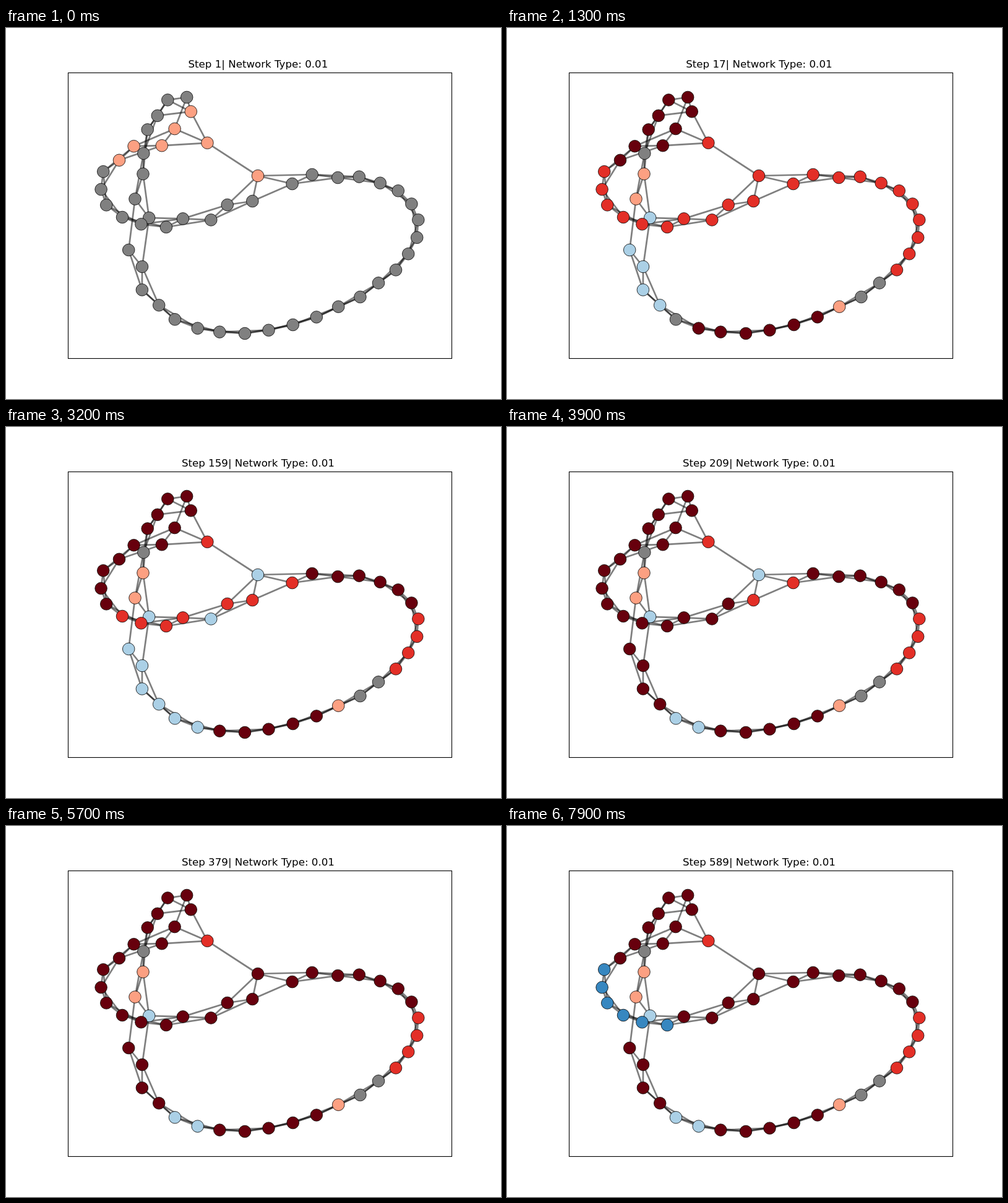
An HTML page that plays this animation: 800 px wide and 600 px high, repeating every 8 s.

```html
<!DOCTYPE html>
<html lang="en">
<head>
<meta charset="utf-8">
<title>Network steps</title>
<style>
  html, body { margin: 0; width: 100%; height: 100%; overflow: hidden; background: #fff; }
  svg { display: block; width: 800px; height: 600px; }
  #edges line { stroke: #000; stroke-opacity: .5; stroke-width: 2.7; }
  #nodes circle { stroke: #000; stroke-width: .8; }
  #title { font: 16.667px "DejaVu Sans", sans-serif; text-anchor: middle; }
</style>
</head>
<body>
<svg viewBox="0 0 800 600">
  <rect x="100.5" y="72.5" width="620" height="462" fill="none" stroke="#000" stroke-width="1.1"/>
  <g id="edges"></g>
  <g id="nodes"></g>
  <text id="title" x="407.4" y="64"></text>
</svg>
<script>
const FRAME_MS = 100, LAST_STEP = 589, RADIUS = 9.8;
const COLORS = {
  gray: '#808080', salmon: '#fca082', red: '#e32f27', dark: '#67000d',
  pale: '#abd0e6', blue: '#3787c0'
};

// Node centres, in ring order.
const nodes = `407,239 462.6,252 494.7,237 536.3,242 570.8,240.6 604.7,250.7 633.8,263.3
  655.4,284.5 666.3,310.3 664.2,338.9 650.2,365.3 630,391.3 602,412.4 572.4,435 537.2,450.7
  501.8,467.5 463.7,480 424.5,488.7 386,494 345.3,491.6 309.7,485.6 273,471.3 247.2,448.3
  219.9,423.5 220,386 198.2,359 231.2,307 208.5,276.5 221.5,236 222.3,202.8 228.7,164.4
  244.8,141.8 261.3,116.4 298.8,135.2 292.2,112 325.4,185.8 272.6,163 251.8,190.2
  206.6,191.2 183,213.8 157.2,232.2 153.6,261 162.2,286.3 188,306 218.4,317.3 258.9,322
  285.9,308.4 331.3,310.4 357.7,286 398.3,280`.trim().split(/\s+/).map(p => p.split(',').map(Number));

// Each node joins its next two neighbours, apart from two rewired links.
const rewired = { '34-35': [35, 0], '25-26': [26, 46] };
const edges = nodes.flatMap((_, i) => [1, 2].map(gap => {
  const j = (i + gap) % nodes.length;
  return rewired[`${i}-${j}`] || [i, j];
}));

// Groups of nodes that take a new colour at a step.
const events = {
  1: 'salmon 0 33 35-39',
  2: 'salmon 49 1-5',
  3: 'red 40-45',
  4: 'salmon 14 22-28',
  5: 'red 6-11',
  6: 'red 26 31-34 46-48',
  8: 'red 15-20',
  10: 'red 0 35-39',
  11: 'dark 30-34',
  12: 'dark 36-39',
  13: 'red 49 1-5',
  15: 'dark 15-20',
  17: 'pale 22-26',
  22: 'dark 40-42',
  25: 'pale 20 21',
  33: 'pale 0 47',
  38: 'dark 2-7',
  174: 'dark 43-48',
  196: 'dark 22-25',
  224: 'dark 0 1 49',
  394: 'blue 40-45'
};

// A picture is kept at every event and at every tenth step.
function buildFrames() {
  const frames = [];
  let colors = nodes.map(() => COLORS.gray);
  for (let step = 1; step <= LAST_STEP; step++) {
    if (events[step]) {
      const [name, ...ranges] = events[step].split(' ');
      colors = colors.slice();
      for (const range of ranges) {
        const [from, to = from] = range.split('-').map(Number);
        colors.fill(COLORS[name], from, to + 1);
      }
    }
    if (events[step] || step % 10 === 9) frames.push({ step, colors });
  }
  return frames;
}

function add(parent, tag, attrs) {
  const el = document.createElementNS('http://www.w3.org/2000/svg', tag);
  for (const key in attrs) el.setAttribute(key, attrs[key]);
  return document.getElementById(parent).appendChild(el);
}

for (const [a, b] of edges) {
  const [x1, y1] = nodes[a], [x2, y2] = nodes[b];
  add('edges', 'line', { x1, y1, x2, y2 });
}
const circles = nodes.map(([cx, cy]) => add('nodes', 'circle', { cx, cy, r: RADIUS }));
const title = document.getElementById('title');
const frames = buildFrames();
let shown = -1;

function draw(time) {
  const index = Math.floor(time / FRAME_MS) % frames.length;
  if (index === shown) return;
  shown = index;
  const { step, colors } = frames[index];
  title.textContent = `Step ${step}| Network Type: 0.01`;
  circles.forEach((circle, i) => circle.setAttribute('fill', colors[i]));
}

const start = performance.now();
function tick() {
  draw(performance.now() - start);
  requestAnimationFrame(tick);
}
tick();
</script>
</body>
</html>
```
